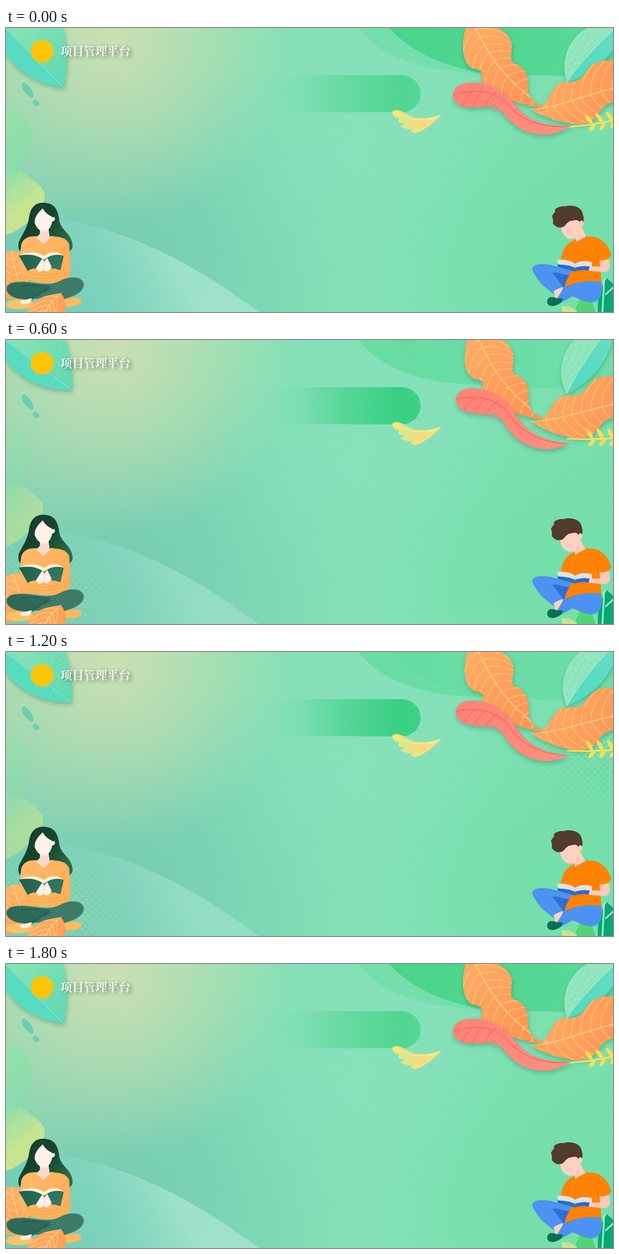
An HTML page with a canvas for the animation above (2000 ms loop, 1093 px wide and 512 px high).

```html
<!DOCTYPE html>
<html lang="zh">
<head>
<meta charset="utf-8">
<title>项目管理平台</title>
<style>
html, body { margin: 0; width: 100%; height: 100%; overflow: hidden; background: #82dfb6; }
canvas { display: block; }
</style>
</head>
<body>
<canvas id="stage" width="1093" height="512"></canvas>
<script>
const W = 1093, H = 512, STEP = 200, LOOP = 2000;
const c = document.getElementById('stage').getContext('2d');

// One value per held pose.
const SWAY = [0, .4, .7, .9, 1, 1, .85, .58, .25, 0];
const LEAD = [0, .6, .85, 1, .95, .85, .5, .22, .05, 0];
const DOTS_L = [0, 0, .08, .3, .55, .75, .4, .12, .04, 0];
const DOTS_R = [0, 0, 0, .03, .15, .3, .35, .3, .12, 0];

function fill(d, color, alpha = 1) {
  c.save();
  c.globalAlpha *= alpha;
  c.fillStyle = color;
  c.fill(new Path2D(d));
  c.restore();
}

function line(d, color, width = 1) {
  c.strokeStyle = color;
  c.lineWidth = width;
  c.lineCap = 'round';
  c.stroke(new Path2D(d));
}

function oval(x, y, rx, ry, turn, color) {
  c.fillStyle = color;
  c.beginPath();
  c.ellipse(x, y, rx, ry, turn, 0, Math.PI * 2);
  c.fill();
}

function linear(x0, y0, x1, y1, ...stops) {
  const g = c.createLinearGradient(x0, y0, x1, y1);
  stops.forEach((s, i) => g.addColorStop(i / (stops.length - 1), s));
  return g;
}

function glow(x, y, r, rgb, alpha) {
  const g = c.createRadialGradient(x, y, 0, x, y, r);
  g.addColorStop(0, `rgba(${rgb},${alpha})`);
  g.addColorStop(.5, `rgba(${rgb},${alpha * .52})`);
  g.addColorStop(1, `rgba(${rgb},0)`);
  c.fillStyle = g;
  c.fillRect(0, 0, W, H);
}

function turned(x, y, degrees, draw) {
  c.save();
  c.translate(x, y);
  c.rotate(degrees * Math.PI / 180);
  c.translate(-x, -y);
  draw();
  c.restore();
}

function shaded(d, color) {
  c.save();
  c.shadowColor = 'rgba(25,115,85,.38)';
  c.shadowBlur = 8;
  c.shadowOffsetX = 1;
  c.shadowOffsetY = 4;
  fill(d, color);
  c.restore();
}

function inside(d, draw) {
  c.save();
  c.clip(new Path2D(d));
  draw();
  c.restore();
}

// Cubic point and heading for rib-based veins.
function along(p, t) {
  const u = 1 - t, w = [u * u * u, 3 * u * u * t, 3 * u * t * t, t * t * t];
  const d = [-u * u, u * u - 2 * u * t, 2 * u * t - t * t, t * t];
  const sum = (k, o) => k.reduce((a, v, i) => a + v * p[i * 2 + o], 0);
  return { x: sum(w, 0), y: sum(w, 1), a: Math.atan2(sum(d, 1), sum(d, 0)) };
}

function veins(p, n, length, lean, color, width = 1.1) {
  line(`M${p[0]} ${p[1]}C${p.slice(2)}`, color, width * 1.7);
  for (let i = 1; i <= n; i++) {
    const { x, y, a } = along(p, i / (n + 1));
    for (const side of [-1, 1]) {
      const b = a + side * lean, e = a + side * (lean - .45);
      line(`M${x} ${y}Q${x + Math.cos(b) * length * .5} ${y + Math.sin(b) * length * .5} ${x + Math.cos(e) * length} ${y + Math.sin(e) * length}`, color, width);
    }
  }
}

function flecks(x, y, cols, rows, angle, color) {
  for (let i = 0; i < cols; i++) for (let j = 0; j < rows; j++) {
    const px = x + i * 12 + j % 2 * 5, py = y + j * 11 + i * 3;
    line(`M${px} ${py}l${Math.cos(angle) * 5} ${Math.sin(angle) * 5}`, color, 1);
  }
}

function dots(x, y, w, h, cx, cy, reach, color, alpha) {
  if (!alpha) return;
  c.save();
  for (let j = 0; j * 6 < h; j++) for (let i = 0; i * 12 < w; i++) {
    const px = x + i * 12 + j % 2 * 6, py = y + j * 6;
    const near = 1 - Math.hypot(px - cx, (py - cy) * 1.25) / reach;
    if (near <= 0) continue;
    c.globalAlpha = alpha * Math.min(1, near * 1.6);
    oval(px, py, 2.6, 2.6, 0, color);
  }
  c.restore();
}

function backdrop() {
  c.fillStyle = linear(0, 0, W, 260, '#91d9b0', '#84dfb4', '#84e1b8', '#78dfac');
  c.fillRect(0, 0, W, H);
  glow(210, 420, 430, '116,200,179', .85);
  glow(190, 25, 330, '208,223,178', .95);
  glow(610, 220, 280, '137,224,190', .6);
  glow(960, 410, 300, '112,222,166', .6);
}

function canopy(p) {
  fill('M635 0C672 48 735 77 850 81C930 87 1010 87 1093 87V0Z', linear(650, 0, 1093, 50, '#66dca2', '#70dfac'), .55 + .45 * p);
  fill('M690 0C727 42 785 67 850 80C930 86 1020 87 1093 86V0Z', linear(700, 0, 1050, 70, '#49d38a', '#58d998'), Math.max(0, 1 - p * 1.02));
}

function pill(p) {
  const g = c.createLinearGradient(475, 0, 746, 0);
  const rgb = `${Math.round(82 - 29 * p)},${Math.round(214 - 7 * p)},${Math.round(146 - 17 * p)}`;
  g.addColorStop(0, `rgba(${rgb},0)`);
  g.addColorStop(.2, `rgba(${rgb},.13)`);
  g.addColorStop(.5, `rgba(${rgb},.6)`);
  g.addColorStop(.85, `rgba(${rgb},1)`);
  g.addColorStop(1, `rgba(${rgb},.95)`);
  fill('M470 85H713A33.5 33.5 0 0 1 713 152H470Z', g);
}

function feather() {
  const d = 'M696 150C704 144 714 151 727 158C740 165 764 164 785 155C772 170 757 183 739 189C731 190 726 186 731 182C720 183 712 180 709 175C715 176 714 174 717 172C707 171 705 168 708 164C700 162 694 156 696 150Z';
  fill(d, linear(700, 146, 765, 185, '#f6e775', '#dce58a', '#f3e083', '#fbe180'));
  inside(d, () => {
    glow(752, 174, 16, '248,205,135', .45);
    line('M699 152Q731 172 775 162', 'rgba(255,246,170,.55)', 1.2);
    line('M713 166Q724 170 738 169M731 182Q741 178 749 169', 'rgba(225,208,115,.5)', 1);
  });
}

function cornerLeaf(p) {
  const d = 'M-30-30C-17 33 17 96 104 107C113 62 113 25 92-30Z';
  turned(0, 0, -9.7 * p, () => {
    shaded(d, '#58dcc1');
    inside(d, () => {
      fill('M-20-20L104 107L150 50L90-60Z', linear(30, 0, 110, 80, '#85e2b5', '#64d9b4'));
      flecks(57, 8, 4, 8, 1.05, 'rgba(67,198,164,.55)');
      line('M-15-15Q50 55 104 107', '#80e5c6', 1.2);
    });
  });
}

function drops() {
  const color = 'rgba(97,206,176,.85)';
  oval(39, 112, 6.5, 16, -.62, color);
  oval(54, 135, 5, 6.5, -.65, color);
}

function blobs(p) {
  c.save();
  c.translate(-2.5 * p, 4 * p);
  fill('M-4 143C35 149 51 176 46 205C43 228 29 237 28 258V262H-4Z', linear(0, 170, 45, 240, '#94e0a8', '#8adcaf'), .95 - .65 * p);
  c.restore();
  c.save();
  c.translate(-3 * p, 0);
  fill('M28 260C50 275 74 289 69 308C65 329 28 368-4 374V262Z', linear(2, 268, 42, 318, '#97e0a7', '#cbe68e'), .95 - .45 * p);
  c.restore();
}

function hill(p) {
  const d = 'M0 337C72 337 147 352 218 377C300 407 382 457 455 512H0Z';
  fill(d, linear(80, 500, 285, 390, 'rgba(111,205,184,.75)', 'rgba(131,214,194,.7)', 'rgba(165,229,207,.82)'), 1 - .35 * p);
}

function topRightLeaf(p) {
  const d = 'M1010 97C999 65 1007 29 1038 5C1060-9 1090-12 1120-20C1107 28 1077 77 1010 97Z';
  turned(1009, 98, -9.5 * p, () => {
    shaded(d, '#92e5bd');
    inside(d, () => {
      fill('M1010 97Q1050 40 1120-20V100Z', linear(1045, 80, 1095, 10, '#55dcc0', '#65ddc6'));
      flecks(1014, 8, 6, 8, 2.1, 'rgba(88,205,166,.65)');
      line('M1010 97Q1050 40 1120-20', '#a6ecd1', 1.1);
    });
  });
}

function orangeLeaf(d, rib, n, length, color) {
  shaded(d, color);
  inside(d, () => veins(rib, n, length, 1.35, '#ffcf88'));
}

function rightLeaves(p, lead) {
  topRightLeaf(lead);
  turned(945, 147, 3 * p, () => orangeLeaf(
    'M943 147C965 142 973 135 980 122C985 104 1000 95 1016 97C1035 98 1040 84 1050 72C1062 57 1082 56 1115 61V129C1094 133 1081 135 1072 147C1060 169 1040 178 1015 172C985 167 965 158 943 147Z',
    [943, 147, 990, 145, 1040, 121, 1112, 104], 9, 64, linear(980, 110, 1080, 160, '#ffa760', '#ff9858')));
  turned(968, 142, 1.8 * p, () => orangeLeaf(
    'M830-10C821 20 818 54 835 70C844 77 860 72 857 87C852 105 868 116 895 125C925 137 945 142 970 143C950 134 938 126 940 101C940 80 930 68 915 64C906 58 911 46 911 32C910 8 882-4 855-10Z',
    [840, -12, 864, 40, 892, 92, 970, 143], 10, 59, linear(830, 15, 930, 120, '#ffaa63', '#ff9755')));
  turned(1014, 178, 8 * p - 8, sprig);
  turned(933, 160, 7.8 * p, pinkLeaf);
}

function sprig() {
  line('M1011 178Q1055 181 1115 177', '#ffe45d', 2.6);
  for (let x = 1055; x < 1115; x += 19) {
    oval(x - 4, 170, 3.8, 10.5, -.5, '#ffdc52');
    oval(x, 185, 3.6, 8.5, .7, '#ffdc52');
  }
}

function pinkLeaf() {
  const d = 'M805 122C805 104 825 96 851 99C884 103 901 119 918 140C939 165 966 177 1017 177C1000 187 983 194 960 192C930 188 915 176 900 160C893 151 888 147 884 146L886 141L880 147L875 145L881 136L872 142C857 143 845 144 833 143C814 141 805 133 805 122Z';
  shaded(d, linear(810, 110, 985, 185, '#ff8275', '#ff8e80'));
  inside(d, () => {
    line('M805 122C852 105 887 117 909 144C933 169 970 181 1017 177', '#f4695f', 1.7);
    for (const [x, y] of [[829, 116], [849, 114], [870, 117]]) {
      line(`M${x + 10} ${y - 1}Q${x - 4} ${y + 12} ${x - 8} ${y + 27}`, '#f5736a', 2.2);
    }
    line('M897 130L895 111M918 150L923 139', '#f5736a', 1.3);
  });
}

function girl(p) {
  const back = 'M-15 410C5 399 21 399 32 411C48 424 47 457 30 488H-15Z';
  c.save();
  c.translate(14 * p, 18 * p);
  turned(25, 475, -9 * p, () => {
    fill(back, linear(0, 405, 35, 480, '#ffb363', '#ffa154'));
    inside(back, () => veins([33, 487, 22, 459, 15, 435, 10, 403], 5, 38, 1.1, '#ffd08f'));
  });
  c.restore();
  fill('M67 315C89 315 94 330 96 347C99 366 119 370 120 393C118 406 106 407 101 402L32 401C24 406 21 398 23 386C29 372 37 363 41 345C43 327 50 315 67 315Z', linear(30, 340, 110, 390, '#123c2c', '#17482f', '#2e6948'));
  fill('M61 358H76L79 379L67 391L54 378L61 371Z', '#fcd9ce');
  fill('M66 325C56 334 50 344 52 352C55 361 62 367 68 367C77 366 82 357 83 349C89 349 90 340 85 340C76 338 71 333 66 325Z', '#fff0e9');
  fill('M66 325C55 334 51 341 51 349C45 340 50 319 66 317C79 318 87 330 86 342C78 338 72 333 66 325Z', '#174332');
  fill('M54 376C43 374 29 379 27 393L23 433C23 445 36 454 51 456L100 462C113 455 118 442 116 425L114 391C110 377 96 377 82 375L67 391Z', linear(30, 390, 110, 440, '#ffb967', '#ffad58'));
  line('M54 376L67 389L81 376', '#ffd6a1', 2);
  line('M101 405C105 421 96 434 83 444M30 409Q32 427 46 440', '#ed9847', 1.1);
  fill('M55 433L81 431L102 437C98 451 86 460 67 460C49 459 36 452 31 440Z', '#ffb25c');
  fill('M23 410C41 404 58 408 68 418C80 407 94 407 104 411L98 437C86 432 77 432 68 438C56 431 46 433 39 438Z', linear(25, 410, 104, 430, '#20614d', '#347862'));
  fill('M23 410C40 402 58 403 68 411C80 402 93 403 104 410C90 407 78 410 68 418C54 407 39 408 23 410Z', '#fff3da');
  fill('M54 433L65 416L69 421L74 414L82 430C80 438 73 441 68 437L59 440Z', '#fff0e9');
  line('M69 421L68 437', '#edcfc3', 1);
  line('M40 441Q67 451 93 442M37 448Q66 457 99 446', '#eca049', 1.1);
  oval(24, 498, 24, 9, -.04, '#ffc16b');
  oval(118, 494, 18, 8, -.08, '#ffb95e');
  fill('M1 471C0 458 20 456 40 458C66 461 81 465 99 455C117 446 137 448 140 461C141 479 114 487 94 491L55 488C31 491 5 489 1 471Z', '#3f7b69');
  fill('M7 462C30 457 56 460 82 470L47 490C23 491 1 484 1 470Z', '#2d6a57');
  line('M28 466Q55 461 79 466Q62 477 42 489', '#255848', 1.3);
  fill('M26 492L47 487L43 496L27 498Z', '#fff0e9');
  const front = 'M36 518C42 493 62 482 99 478C106 486 109 501 106 518Z';
  fill(front, linear(50, 485, 105, 512, '#ffad60', '#ff9e54'));
  inside(front, () => veins([99, 478, 86, 488, 75, 502, 67, 519], 4, 44, 1, '#ffd294'));
}

function boy(headUp) {
  fill('M1066 512C1064 488 1070 466 1082 451L1093 461V512Z', '#07a875');
  line('M1077 453L1074 512M1080 480L1093 468', '#a4edbf', 3);
  fill('M1024 512C1029 494 1035 485 1041 484C1055 490 1058 500 1061 512Z', '#4fd574');
  fill('M1000 503C1010 499 1021 503 1029 512H1002Z', '#c6e58c');
  fill('M1029 487L1043 512', '#2ca665');
  fill('M965 430L1020 438L1010 464L1000 469Z', '#2f6fd2');
  fill('M947 435C949 424 966 424 985 428L1018 438L1014 446C1000 443 990 441 983 440L1004 468L994 483C978 476 956 457 947 435Z', '#4b92f2');
  fill('M986 474L1001 467L1007 482L990 490Z', '#fbd0c2');
  fill('M1071 448C1074 466 1075 485 1062 493C1050 499 1033 488 1020 484L1000 495L992 488L1005 467C1024 452 1048 447 1071 448Z', '#4c92f2');
  line('M1008 469Q1025 457 1042 456', '#3476d5', 1.2);
  fill('M977 487C984 481 991 490 1001 487C1005 492 998 498 987 501C974 503 972 493 977 487Z', '#087057');
  fill('M1069 413L1086 418C1088 429 1089 439 1078 440L1048 438L1052 430L1070 430Z', '#ffc9ba');
  fill('M1029 378C1045 374 1065 375 1074 384C1084 391 1088 403 1090 410C1084 417 1075 421 1069 418L1072 458C1050 454 1030 457 1008 467C1003 463 1014 449 1018 437L999 419C1001 405 1006 391 1017 386Z', '#ff8204');
  line('M1067 416Q1065 403 1060 397M1024 437Q1049 443 1069 436', '#e86f00', 1.2);
  fill('M1069 420L1086 418C1088 429 1089 439 1078 440L1050 438L1054 430L1070 430Z', '#ffc9ba');
  fill('M994 422C1005 421 1018 424 1024 429C1034 424 1046 424 1055 428L1053 438C1041 435 1031 436 1024 439C1015 436 1002 434 993 430Z', '#286bd0');
  fill('M992 418C1006 417 1018 419 1024 425C1034 420 1043 419 1055 422L1055 431C1044 428 1034 429 1024 432C1016 428 1005 427 994 426Z', '#dde4e3');
  line('M1024 427V434', '#96b5d4', 1);
  fill('M1051 430L1064 430L1062 438L1049 438Z', '#ffcdbe');
  c.save();
  if (headUp) c.translate(2, -1.3);
  fill('M998 354C996 368 1004 380 1015 382L1023 380L1025 387L1043 377L1036 364L1036 346L1014 342Z', '#ffd0c2');
  line('M1026 379Q1031 375 1032 370', '#efb4a5', 1.4);
  fill('M983 346C979 338 985 336 987 332C984 327 995 322 1004 323C1018 319 1035 323 1037 338C1040 346 1037 355 1034 361L1031 352C1028 345 1020 348 1017 349C1014 348 1009 352 1005 357C999 364 988 361 983 354Z', '#513b2c');
  oval(1034, 354, 4, 5.5, .2, '#ffcbbb');
  c.restore();
}

function brand() {
  oval(65, 42, 20.5, 20.5, 0, '#fdc508');
  c.save();
  c.font = 'bold 21px "Noto Serif CJK SC", "Noto Serif SC", "Noto Sans CJK SC", "Noto Sans CJK", serif';
  c.textBaseline = 'alphabetic';
  c.fillStyle = '#f1f6ed';
  c.shadowColor = 'rgba(45,80,65,.7)';
  c.shadowBlur = 7;
  c.shadowOffsetX = 4;
  c.shadowOffsetY = 2;
  c.fillText('项目管理平台', 98, 49);
  c.restore();
}

function draw(ms) {
  const k = Math.floor(ms % LOOP / STEP), p = SWAY[k];
  backdrop();
  canopy(p);
  pill(p);
  feather();
  cornerLeaf(p);
  drops();
  hill(p);
  blobs(p);
  dots(0, 374, 240, 138, 75, 470, 165, '#b6df91', DOTS_L[k]);
  dots(940, 90, 153, 180, 1093, 180, 150, '#51cf9b', DOTS_R[k]);
  rightLeaves(p, LEAD[k]);
  girl(p);
  boy(k === 0 || k === 8);
  brand();
}

const start = performance.now();
function tick(now) {
  draw(Math.max(0, now - start));
  requestAnimationFrame(tick);
}
draw(0);
requestAnimationFrame(tick);
</script>
</body>
</html>
```
